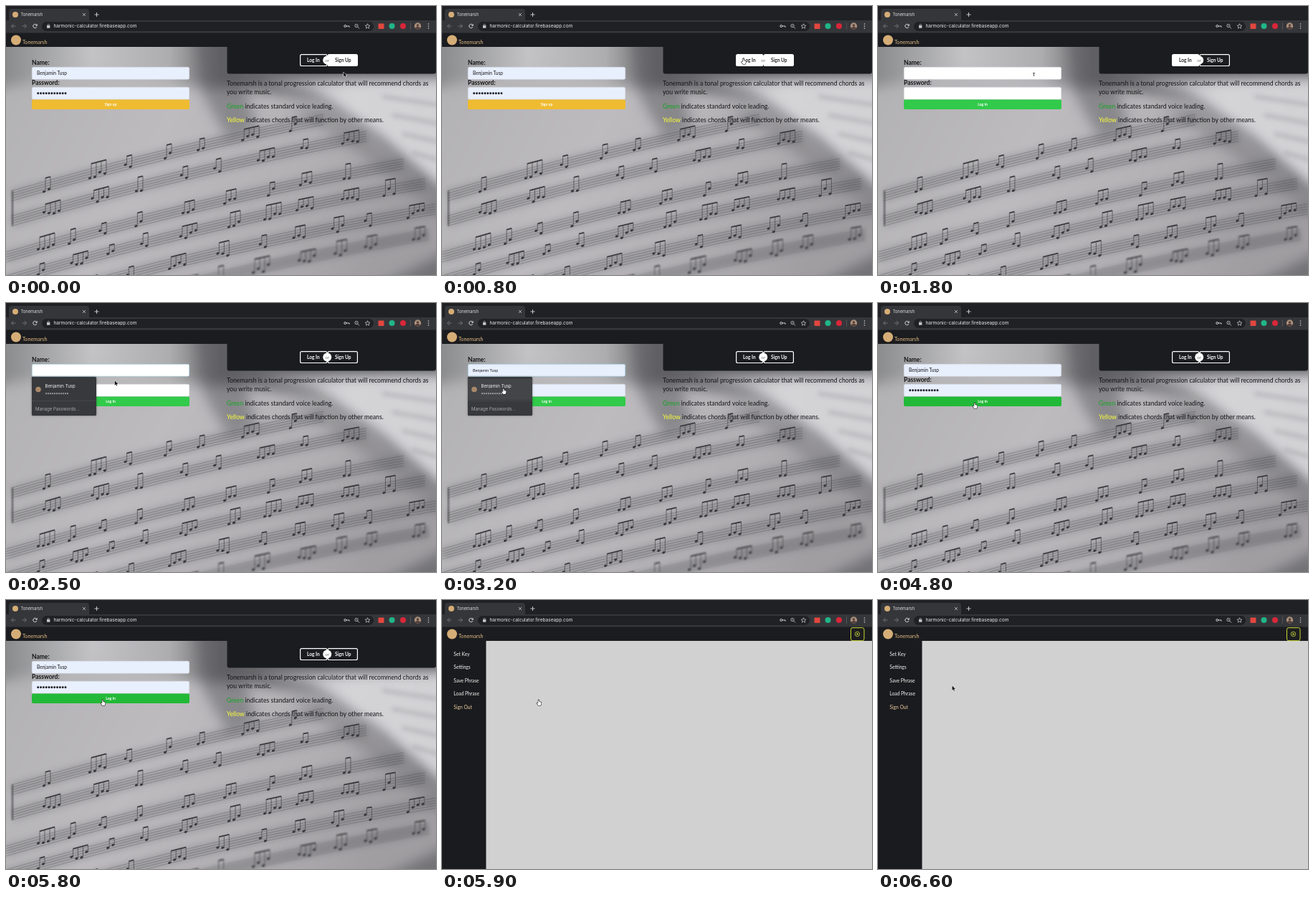
An HTML page with a canvas for the animation above (6700 ms loop, 600 px wide and 375 px high).

```html
<!DOCTYPE html>
<html lang="en">
<head>
<meta charset="utf-8">
<title>Tonemarsh</title>
<style>
html, body { margin: 0; width: 100%; height: 100%; overflow: hidden; background: #1b1c1d; }
canvas { display: block; width: 600px; height: 375px; }
</style>
</head>
<body>
<canvas id="stage"></canvas>
<script>
const W = 600, H = 375, LOOP = 6700;
const BRAND = 'Tonemarsh', USER = 'Benjamin Tusp';
const LATO = 'Lato, sans-serif', INTER = 'Inter, sans-serif';
const DARK = '#1b1c1f', BAR = '#35363a', GOLD = '#d5ad77';

const dpr = window.devicePixelRatio || 1;
const stage = document.getElementById('stage');
let c = setup(stage);

function setup(canvas) {
  canvas.width = W * dpr;
  canvas.height = H * dpr;
  const ctx = canvas.getContext('2d');
  ctx.scale(dpr, dpr);
  return ctx;
}

function rect(x, y, w, h, fill, r = 0, stroke, line = 1) {
  c.beginPath();
  c.roundRect(x, y, w, h, r);
  if (fill) { c.fillStyle = fill; c.fill(); }
  if (stroke) { c.strokeStyle = stroke; c.lineWidth = line; c.stroke(); }
}

function circle(x, y, r, fill, stroke, line = 1) {
  c.beginPath();
  c.arc(x, y, r, 0, Math.PI * 2);
  if (fill) { c.fillStyle = fill; c.fill(); }
  if (stroke) { c.strokeStyle = stroke; c.lineWidth = line; c.stroke(); }
}

function path(points, fill, stroke, line = 1, close = true) {
  c.beginPath();
  points.forEach(([x, y], i) => i ? c.lineTo(x, y) : c.moveTo(x, y));
  if (close) c.closePath();
  if (stroke) { c.strokeStyle = stroke; c.lineWidth = line; c.stroke(); }
  if (fill) { c.fillStyle = fill; c.fill(); }
}

function text(s, x, y, size, color, family = LATO, weight = 400, align = 'left') {
  c.font = `${weight} ${size}px ${family}`;
  c.textAlign = align;
  c.fillStyle = color;
  c.fillText(s, x, y);
  return c.measureText(s).width;
}

function gradient(x0, y0, x1, y1, ...stops) {
  const g = c.createLinearGradient(x0, y0, x1, y1);
  stops.forEach(([at, color]) => g.addColorStop(at, color));
  return g;
}

function blur(r) {
  c.filter = r ? `blur(${r * dpr}px)` : 'none';
}

// ---- backdrop: an open music book in soft tones ----

function randomizer(seed) {
  return () => (seed = seed * 16807 % 2147483647) / 2147483647;
}

const rise = (x, y0) => y0 - 0.29 * x + 0.0001 * x * x;

function curve(y0, from, to, color, line) {
  const pts = [];
  for (let x = from; x <= to; x += 15) pts.push([x, rise(x, y0)]);
  path(pts, null, color, line, false);
}

function staff(y0, from, to, rnd, soft) {
  blur(4);
  curve(y0 + 7, from, to, 'rgba(70,70,74,.22)', 18);
  blur(soft);
  for (let i = 0; i < 5; i++) curve(y0 + i * 3.5, from, to, 'rgba(60,60,64,.5)', 0.6);
  for (let x = from + 45; x < to - 30; x += 42 + rnd() * 26) {
    const count = 2 + Math.floor(rnd() * 3), top = y0 - 3 - rnd() * 5;
    for (let i = 0; i < count; i++) {
      const nx = x + i * 7, ny = rise(nx, y0 + 5 + rnd() * 9);
      c.fillStyle = '#3a393c';
      c.beginPath();
      c.ellipse(nx, ny, 2.2, 1.6, -0.4, 0, 7);
      c.fill();
      path([[nx + 2, ny], [nx + 2, rise(nx, top)]], null, '#454448', 0.7, false);
    }
    const last = x + (count - 1) * 7;
    path([[x + 2, rise(x, top)], [last + 2, rise(last, top)]], null, '#3a393c', 1.8, false);
  }
}

function drawBackdrop() {
  c.beginPath();
  c.rect(0, 57, W, 318);
  c.clip();
  rect(0, 57, W, 318, gradient(0, 0, W, 0, [0, '#8b8c8e'], [0.2, '#c3c3c5'], [0.38, '#adadaf'], [0.5, '#68686b'], [1, '#5c5c60']));
  blur(9);
  path([[-30, 118], [120, 92], [255, 112], [345, 118], [440, 128], [515, 180], [640, 295], [640, 410], [-30, 410]],
    gradient(0, 100, 500, 375, [0, '#b2b1b3'], [0.4, '#bdbbbe'], [0.75, '#b2b0b3'], [1, '#a09ea1']));
  path([[262, 40], [310, 40], [350, 170], [310, 185], [275, 125]], 'rgba(88,88,92,.5)');
  path([[350, 104], [640, 98], [640, 284], [520, 182], [430, 122]],
    gradient(390, 0, 600, 0, [0, '#b4b3b6'], [0.4, '#d4d3d6'], [1, '#d2d1d4']));
  path([[390, 134], [455, 142], [530, 202], [630, 290], [630, 312], [500, 212]], 'rgba(95,94,98,.32)');
  path([[500, 400], [640, 330], [640, 400]], 'rgba(70,70,74,.5)');
  blur(3);
  for (let i = 0; i < 4; i++) {
    const y = 126 + i * 26;
    path([[525 + i * 14, y], [610, y + 13]], null, 'rgba(100,99,103,.3)', 4, false);
  }
  const rnd = randomizer(41);
  staff(260, 8, 445, rnd, 0.3);
  staff(295, 8, 505, rnd, 0.2);
  staff(343, 0, 555, rnd, 0.2);
  staff(376, 0, 590, rnd, 0.4);
  staff(414, 60, 600, rnd, 0.7);
  staff(448, 200, 600, rnd, 1);
  path([[9, rise(9, 260)], [9, rise(9, 309)]], null, '#3a393c', 1.5, false);
}

const backdrop = document.createElement('canvas');
const screen = c;
c = setup(backdrop);
drawBackdrop();
c = screen;

// ---- browser frame ----

function drawBrowser() {
  rect(0, 0, W, 20, '#202124');
  rect(4, 4, 112, 20, BAR, 4);
  rect(0, 20, W, 18, BAR);
  circle(13, 12, 4, GOLD);
  text(BRAND, 20.5, 14, 5.8, '#dfe0e2', INTER);
  path([[107, 10], [111, 14]], null, '#c5c7ca', 0.8, false);
  path([[111, 10], [107, 14]], null, '#c5c7ca', 0.8, false);
  path([[123.5, 12], [129.5, 12]], null, '#d5d6d8', 0.9, false);
  path([[126.5, 9], [126.5, 15]], null, '#d5d6d8', 0.9, false);

  const arrow = (x, d, color) => {
    path([[x - 3 * d, 28], [x + 3 * d, 28]], null, color, 0.9, false);
    path([[x, 25], [x + 3 * d, 28], [x, 31]], null, color, 0.9, false);
  };
  arrow(10.5, -1, '#77797d');
  arrow(25.5, 1, '#77797d');
  c.beginPath();
  c.arc(40.5, 28, 2.7, 0.4, 5.5);
  c.strokeStyle = '#d8d9db';
  c.lineWidth = 1;
  c.stroke();
  path([[43.7, 24.7], [43.7, 27.7], [40.7, 27.7]], '#d8d9db');

  rect(50, 22, 463, 13, '#202124', 6.5);
  rect(57, 27, 4.4, 3.8, '#c3c5c8', 0.5);
  c.beginPath();
  c.arc(59.2, 26.8, 1.4, Math.PI, 0);
  c.strokeStyle = '#c3c5c8';
  c.lineWidth = 0.7;
  c.stroke();
  text('harmonic-calculator.firebaseapp.com', 66.4, 30.3, 6.55, '#e8eaed', INTER);

  circle(473.3, 28, 1.5, null, '#d2d3d6');
  path([[475, 28], [479, 28], [479, 29.7]], null, '#d2d3d6', 1, false);
  circle(489, 27.5, 2.2, null, '#c3c5c8', 0.8);
  path([[490.7, 29.2], [493, 31.5]], null, '#c3c5c8', 0.9, false);
  path([[488, 27.5], [490, 27.5]], null, '#c3c5c8', 0.6, false);
  path(Array.from({ length: 10 }, (_, i) => {
    const a = i * Math.PI / 5 - Math.PI / 2, r = i % 2 ? 1.6 : 3.6;
    return [504.5 + r * Math.cos(a), 28.3 + r * Math.sin(a)];
  }), null, '#d2d3d6', 0.7);

  rect(519.5, 24.5, 8, 7.5, '#e2473f', 1);
  circle(538.5, 28, 4, '#20b687');
  circle(554, 28, 4, '#da2638');
  rect(564, 23, 0.6, 10, '#66686c');
  c.save();
  circle(574.5, 28, 4.7, '#a98f7b');
  c.clip();
  circle(574.5, 27, 1.7, '#54413b');
  circle(574.5, 33, 4, '#54413b');
  c.restore();
  for (const y of [25, 28, 31]) circle(589.5, y, 0.8, '#d2d3d6');

  rect(0, 37.5, W, 19.5, DARK);
  circle(14, 47.5, 7, GOLD);
  text(BRAND, 23, 53, 7.2, '#e0bb86');
}

// ---- pages ----

function toggle(x, w, label, solid) {
  rect(x + 0.6, 67.7, w - 1.2, 15.8, solid ? '#fff' : DARK, 2, '#fff', 1.2);
  text(label, x + w / 2 - (x < 440 ? 0.5 : -0.5), 77.8, 6.6, solid ? '#252629' : '#fff', LATO, 700, 'center');
}

function field(y, fill, focus) {
  rect(36.3, y + 0.3, 219.4, 16.9, fill, 2, focus ? '#96c8da' : '#d7dbe2', 0.6);
}

function drawIntro() {
  rect(308.5, 52, 291.5, 42.5, DARK, 3);
  const size = 8.7, ink = '#151517';
  text(BRAND + ' is a tonal progression calculator that will recommend chords as', 308, 111.3, size, ink);
  text('you write music.', 308, 122.8, size, ink);
  let w = text('Green', 308, 142.5, size, '#16a526');
  text(' indicates standard voice leading.', 308 + w, 142.5, size, ink);
  w = text('Yellow', 308, 161.5, size, '#fbff38');
  text(' indicates chords that will function by other means.', 308 + w, 161.5, size, ink);
}

function drawMenu(hover) {
  c.shadowColor = 'rgba(0,0,0,.4)';
  c.shadowBlur = 3 * dpr;
  rect(36, 103, 90, 54, '#37393c', 1.5);
  c.shadowBlur = 0;
  if (hover) rect(36, 106, 90, 29, '#434548');
  rect(36, 136, 90, 0.6, '#535558');
  circle(45, 120.5, 3.8, '#a98869');
  text(USER, 54.5, 117.5, 6.1, '#f0f1f2', INTER);
  text('***********', 54.5, 129.5, 6, '#d4d5d7', INTER);
  text('Manage Passwords...', 41, 150, 6.1, '#a9acb0', INTER);
}

function drawLogin(s) {
  c.drawImage(backdrop, 0, 0, W, H);
  drawIntro();
  toggle(410, 38.5, 'Log In', s.overLog || s.logFocus);
  toggle(448.5, 42.5, 'Sign Up', s.signup || s.overSign);
  circle(448.2, 75.5, 6, '#fff');
  text('or', 448.2, 77.6, 6.2, '#77787b', LATO, 400, 'center');

  const tint = s.filled || s.preview ? '#e8effd' : '#fff';
  text('Name:', 36, 82.3, 8.5, '#151517', LATO, 700);
  field(85, tint, s.menu);
  text('Password:', 36, 110.3, 8.5, '#151517', LATO, 700);
  field(113, tint);
  if (s.filled) {
    text(USER, 43, 96, 6.6, '#17181c');
    for (let i = 0; i < 11; i++) circle(44.7 + i * 3.83, 121.8, 1.45, '#17181c');
  } else if (s.preview) {
    text(USER, 43, 95.5, 5.3, '#17181c', '"Liberation Sans", sans-serif');
  }
  const green = s.overSubmit ? '#22b938' : '#31ca4a';
  rect(36, 130.6, 220, 13.4, s.signup ? '#efbb30' : green, 2);
  text(s.signup ? 'Sign up' : 'Log In', 146, 139.2, 5.1, '#fff', LATO, 700, 'center');
  if (s.menu) drawMenu(s.preview);
}

function drawApp() {
  rect(0, 57, W, 318, '#d2d1d2');
  rect(0, 57, 61.5, 318, '#1a1b1e');
  ['Set Key', 'Settings', 'Save Phrase', 'Load Phrase', 'Sign Out'].forEach((label, i) =>
    text(label, 16.3, 77.7 + i * 18.5, 6.7, i === 4 ? '#f0cfa2' : '#f4f4f4'));
  rect(570.5, 38.7, 18.5, 18, '#1c1d1f', 2.5, '#c9d831', 1);
  circle(579.5, 47.5, 3.2, null, '#d9e83f', 0.8);
  path([[578.6, 45.9], [581.4, 47.5], [578.6, 49.1]], '#d9e83f');
}

// ---- pointer ----

const ROUTE = [
  [0, 471, 92], [100, 471, 92], [700, 420.5, 75], [1100, 420.5, 75], [1700, 217.5, 95.5],
  [2200, 217.5, 95.5], [2800, 86, 121], [3600, 86, 121], [4500, 135, 141],
  [6100, 135, 141], [6600, 103.5, 119.5]
];

function pointerAt(t) {
  const i = ROUTE.findIndex(p => p[0] > t);
  if (i < 0) return ROUTE[ROUTE.length - 1].slice(1);
  const [t0, x0, y0] = ROUTE[i - 1], [t1, x1, y1] = ROUTE[i];
  const u = (t - t0) / (t1 - t0), e = u * u * (3 - 2 * u);
  return [x0 + (x1 - x0) * e, y0 + (y1 - y0) * e];
}

function drawPointer(x, y, kind) {
  c.save();
  c.translate(x, y);
  c.lineJoin = 'round';
  if (kind === 'arrow') {
    path([[0, 0], [0, 6.4], [1.5, 5.1], [2.5, 7.3], [3.5, 6.9], [2.6, 4.7], [4.5, 4.6]], '#111', '#fff', 1);
  } else if (kind === 'beam') {
    for (const [color, line] of [['rgba(255,255,255,.8)', 1.8], ['#222', 0.8]]) {
      path([[-1.3, -2], [1.3, -2]], null, color, line, false);
      path([[0, -2], [0, 2.4]], null, color, line, false);
    }
  } else {
    path([[-0.7, -1.6], [0.5, -1.6], [0.6, 0.9], [3.4, 1.6], [3.5, 3.7], [2.6, 6], [-0.6, 6],
      [-2.7, 3.1], [-2, 2.3], [-0.8, 3]], '#fff', '#111', 1.1);
  }
  c.restore();
}

function draw(t) {
  const [x, y] = pointerAt(t);
  const over = (x0, y0, x1, y1) => x >= x0 && x <= x1 && y >= y0 && y <= y1;
  const app = t >= 5900;
  const signup = t < 1000, menu = t >= 2100 && t < 3600;
  const s = {
    signup, menu,
    filled: signup || t >= 3600,
    logFocus: t >= 1000 && t < 2100,
    preview: menu && over(36, 106, 126, 135),
    overLog: over(410, 67, 448, 84),
    overSign: over(449, 67, 491, 84),
    overSubmit: over(36, 131, 256, 144)
  };
  drawBrowser();
  if (app) drawApp(); else drawLogin(s);
  const hand = app ? t < 6200 : s.preview || s.overLog || s.overSign || s.overSubmit;
  const beam = !app && (over(36, 85, 256, 102) || over(36, 113, 256, 130));
  drawPointer(x, y, hand ? 'hand' : beam ? 'beam' : 'arrow');
}

const start = performance.now();
function tick() {
  const t = (performance.now() - start) % LOOP;
  draw(Math.floor(t / 100) * 100);
  requestAnimationFrame(tick);
}
tick();
</script>
</body>
</html>
```
